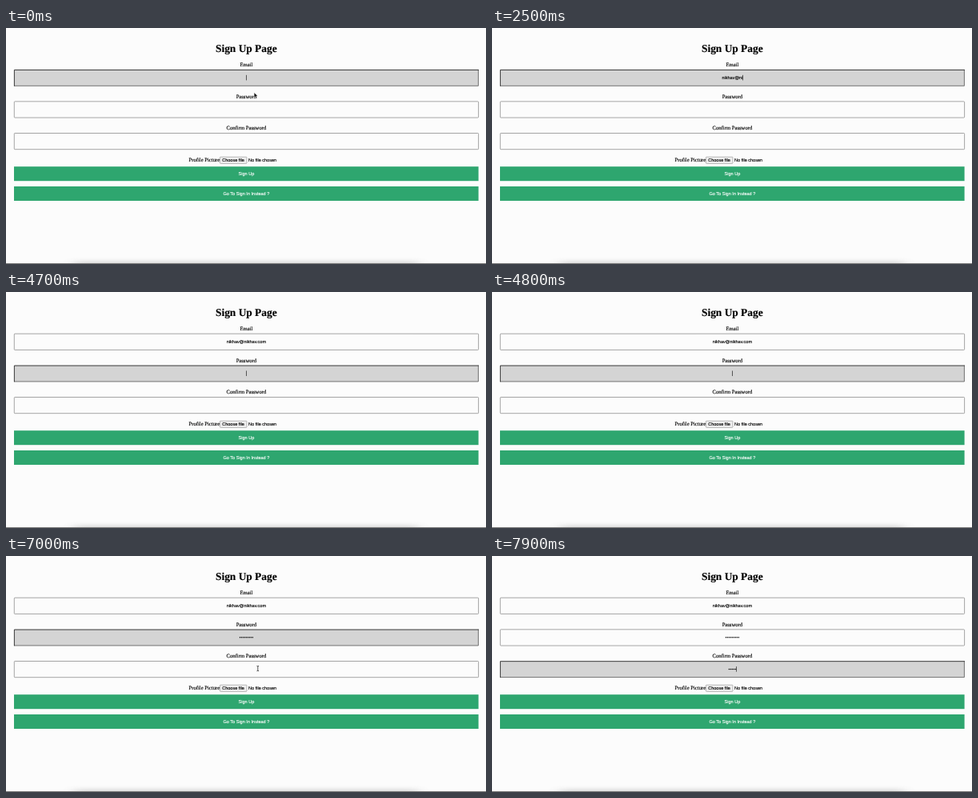
These frames come from a looping animation (600 by 295 pixels, 8 s). An HTML page:

```html
<!DOCTYPE html>
<html lang="en">
<head>
<meta charset="utf-8">
<title>Sign Up Page</title>
<style>
  html, body { margin: 0; width: 100%; height: 100%; overflow: hidden; background: #fcfcfc; }
  svg { display: block; width: 100vw; height: 100vh; }
  text {
    font: 5.556px "Liberation Sans", Arial, sans-serif; text-rendering: geometricPrecision;
    fill: currentColor; stroke: currentColor; stroke-width: .14;
  }
  .serif { font: 6.667px "Liberation Serif", Times, serif; }
  .title { font: bold 13.4px "Liberation Serif", Times, serif; }
  .mid { text-anchor: middle; }
  .white { color: #fff; }
  .box { fill: #fcfcfc; stroke: #808080; stroke-width: .7; rx: .8px; }
  .edge { fill: none; stroke-width: .85; visibility: hidden; }
  .focus .box { fill: #d4d4d4; stroke: none; rx: 0; }
  .focus .edge { visibility: visible; }
</style>
</head>
<body>
<svg viewBox="0 0 600 295">
  <defs><filter id="soft" x="-10%" y="-300%" width="120%" height="700%"><feGaussianBlur stdDeviation="8 3"/></filter></defs>
  <text class="title mid" x="300.3" y="30">Sign Up Page</text>
  <g id="form"></g>
  <text class="serif" x="228.5" y="167.2">Profile Picture</text>
  <rect x="267.4" y="161.2" width="33.6" height="8.2" rx=".8" fill="#efefef" stroke="#767676" stroke-width=".5"/>
  <text x="270.2" y="167.2">Choose file</text>
  <text x="303" y="167.2">No file chosen</text>
  <g fill="#2ea66f">
    <rect x="10" y="173.2" width="580.6" height="18"/>
    <rect x="10" y="198" width="580.6" height="18"/>
  </g>
  <text class="mid white" x="300.4" y="184.1">Sign Up</text>
  <text class="mid white" x="300.4" y="208.8">Go To Sign In Instead ?</text>
  <rect x="85" y="293" width="430" height="6" fill="#888" opacity=".45" filter="url(#soft)"/>
  <rect y="294" width="600" height="1" fill="#777"/>
  <path id="squiggle" fill="none" stroke="#f03030" stroke-width=".8" stroke-dasharray="1.1 .5" d="M279.4 65.3h16M301.2 65.3h16"/>
  <rect id="caret" width=".6" height="6.6"/>
  <path id="arrow" d="M310.2 80.8v6.2l1.4-1.3 1 2.3 1.1-.5-1-2.2h1.9z" stroke="#fff" stroke-width=".4"/>
  <path id="beam" fill="none" stroke="#111" stroke-width=".7" d="M-1.3-3.2Q0-3.2 0-2.2V2.2Q0 3.2-1.3 3.2M1.3-3.2Q0-3.2 0-2.2M0 2.2Q0 3.2 1.3 3.2"/>
</svg>
<script>
const LOOP = 8000, MID = 300.4, DOT = 1.98, KEY_GAP = 100;
const $ = id => document.getElementById(id);
const show = (el, on) => el.setAttribute("visibility", on ? "visible" : "hidden");

function add(parent, tag, attrs, content = "") {
  const el = document.createElementNS("http://www.w3.org/2000/svg", tag);
  for (const k in attrs) el.setAttribute(k, attrs[k]);
  el.textContent = content;
  return parent.appendChild(el);
}

// Each burst is "start x keys"; "<" in the keys is a backspace.
const fields = [
  { label: "Email", at: 0, keys: "nikhav@nih<khav.com",
    bursts: "300x2 700x3 1100x1 1600x1 2000x3 2500x5 3600x1 3900x3" },
  { label: "Password", at: 4700, keys: "*********", bursts: "5100x3 5800x3 6300x3" },
  { label: "Confirm Password", at: 7100, keys: "*****", bursts: "7300x3 7800x2" }
];

fields.forEach((f, i) => {
  f.y = 52 + i * 39.65;
  f.times = f.bursts.split(" ").flatMap(burst => {
    const [start, n] = burst.split("x").map(Number);
    return Array.from({ length: n }, (_, k) => start + k * KEY_GAP);
  });
  const { y } = f;
  f.group = add($("form"), "g", {});
  add(f.group, "text", { class: "serif mid", x: MID, y: y - 4 }, f.label);
  add(f.group, "rect", { class: "box", x: 10.3, y: y + .2, width: 580.3, height: 20.2 });
  add(f.group, "path", { class: "edge", d: `M10 ${y + 20.3}H590.4V${y}`, stroke: "#606060" });
  add(f.group, "path", { class: "edge", d: `M10.4 ${y + 20.6}V${y + .4}H590.8`, stroke: "#1c1c1c" });
  if (i === 0) f.value = add(f.group, "text", { class: "mid", x: MID, y: y + 12 });
  else f.dots = f.times.map(() => add(f.group, "circle", { cy: y + 10.1, r: .75 }));
});

function typedText(f, t) {
  const n = f.times.filter(k => k <= t).length;
  return [...f.keys.slice(0, n)].reduce((s, c) => c === "<" ? s.slice(0, -1) : s + c, "");
}

function draw(t) {
  const active = fields.findLast(f => f.at <= t);
  for (const f of fields) {
    const text = typedText(f, t), n = text.length;
    f.group.setAttribute("class", f === active ? "focus" : "");
    if (f.value) {
      f.value.textContent = text;
      f.width = n && f.value.getComputedTextLength();
      show($("squiggle"), n > 13 && n < 16);
    } else {
      f.width = n * DOT;
      f.dots.forEach((dot, i) => {
        dot.setAttribute("cx", MID + (i - (n - 1) / 2) * DOT);
        show(dot, i < n);
      });
    }
  }

  const lastKey = active.times.findLast(k => k <= t) ?? active.at;
  $("caret").setAttribute("x", MID + active.width / 2);
  $("caret").setAttribute("y", active.y + 6.8);
  show($("caret"), (t - lastKey) % 800 < 300);

  show($("arrow"), t < 300);
  const step = Math.min(1, Math.max(0, (t - 6700) / 300));
  $("beam").setAttribute("transform", `translate(${312 + 2.8 * step} ${101 + 39.6 * step})`);
  show($("beam"), t >= 6700 && t < 7300);
}

let start;
function tick(now) {
  start ??= now;
  draw((now - start) % LOOP);
  requestAnimationFrame(tick);
}
draw(0);
requestAnimationFrame(tick);
</script>
</body>
</html>
```
